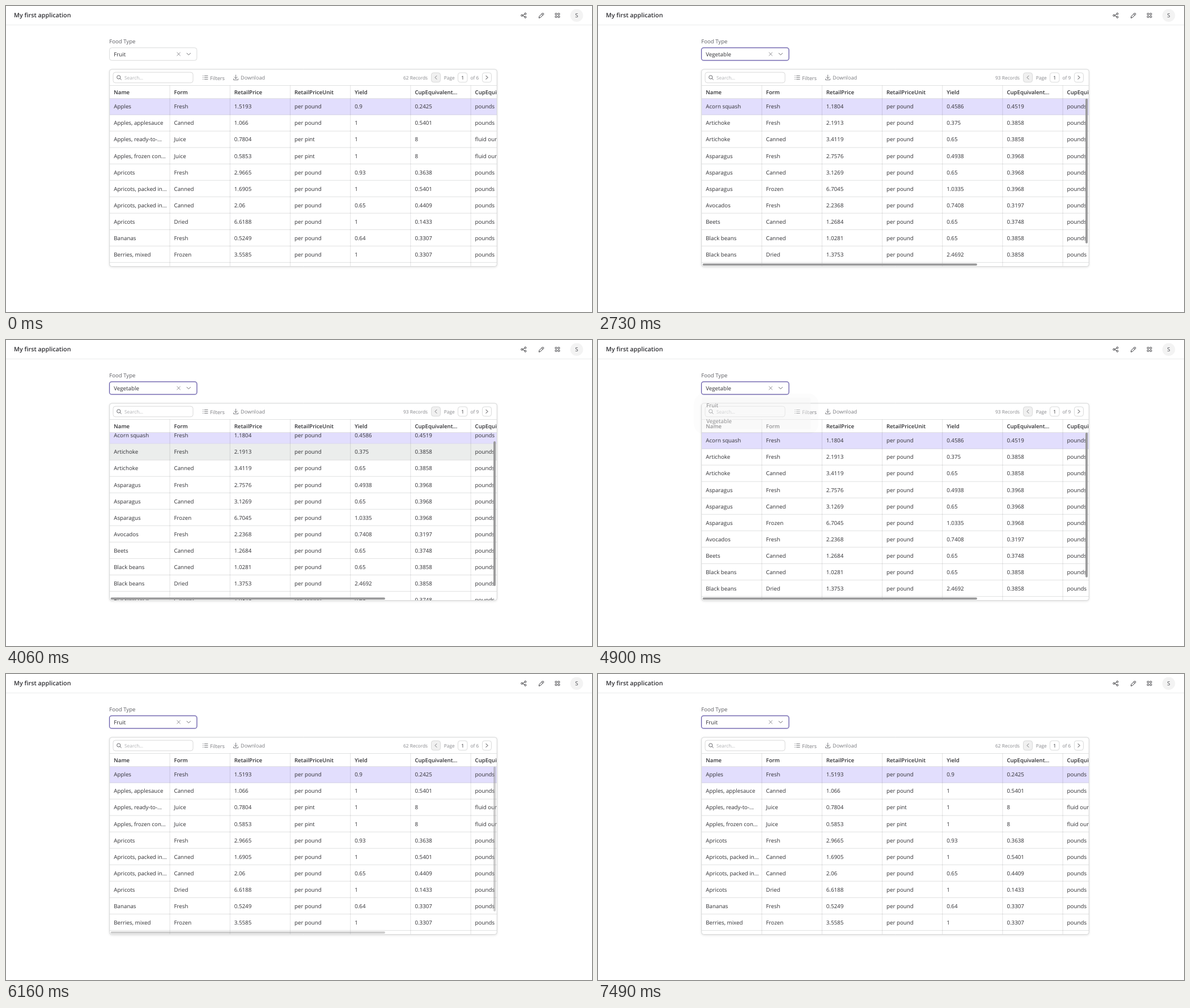
These frames come from a looping animation (1034x541 px, 7840 ms). An HTML page with a canvas:

```html
<!DOCTYPE html>
<html lang="en">
<head>
<meta charset="utf-8">
<title>My first application</title>
<style>
html, body { margin: 0; width: 100%; height: 100%; overflow: hidden; background: #fff; }
canvas { display: block; width: 1034px; height: 541px; }
</style>
</head>
<body>
<canvas id="stage"></canvas>
<script>
const W = 1034, H = 541, LOOP = 7840, STEP = 70;
const canvas = document.getElementById('stage');
const ctx = canvas.getContext('2d');
const dpr = window.devicePixelRatio || 1;
canvas.width = W * dpr;
canvas.height = H * dpr;

const INK = '#2f2f33', GRAY = '#7b7c80', LINE = '#e0e1e1', BORDER = '#d9dada';
const ACCENT = '#655aa8', SELECTED = '#e2defd', HOVER = '#ebedec';
const LEFT = 182.8, RIGHT = 866, BODY = 163.5, BOTTOM = 460, COL = 106.22, ROW = 29.03;

const HEADS = ['Name', 'Form', 'RetailPrice', 'RetailPriceUnit', 'Yield', 'CupEquivalent...', 'CupEquivalentUnit'];
const parse = text => text.trim().split('\n').map(line => line.trim().split('|'));
const FRUIT = parse(`
  Apples|Fresh|1.5193|per pound|0.9|0.2425|pounds
  Apples, applesauce|Canned|1.066|per pound|1|0.5401|pounds
  Apples, ready-to-...|Juice|0.7804|per pint|1|8|fluid ounces
  Apples, frozen con...|Juice|0.5853|per pint|1|8|fluid ounces
  Apricots|Fresh|2.9665|per pound|0.93|0.3638|pounds
  Apricots, packed in...|Canned|1.6905|per pound|1|0.5401|pounds
  Apricots, packed in...|Canned|2.06|per pound|0.65|0.4409|pounds
  Apricots|Dried|6.6188|per pound|1|0.1433|pounds
  Bananas|Fresh|0.5249|per pound|0.64|0.3307|pounds
  Berries, mixed|Frozen|3.5585|per pound|1|0.3307|pounds`);
const VEGETABLES = parse(`
  Acorn squash|Fresh|1.1804|per pound|0.4586|0.4519|pounds
  Artichoke|Fresh|2.1913|per pound|0.375|0.3858|pounds
  Artichoke|Canned|3.4119|per pound|0.65|0.3858|pounds
  Asparagus|Fresh|2.7576|per pound|0.4938|0.3968|pounds
  Asparagus|Canned|3.1269|per pound|0.65|0.3968|pounds
  Asparagus|Frozen|6.7045|per pound|1.0335|0.3968|pounds
  Avocados|Fresh|2.2368|per pound|0.7408|0.3197|pounds
  Beets|Canned|1.2684|per pound|0.65|0.3748|pounds
  Black beans|Canned|1.0281|per pound|0.65|0.3858|pounds
  Black beans|Dried|1.3753|per pound|2.4692|0.3858|pounds
  Blackeye peas|Canned|1.0375|per pound|0.65|0.3748|pounds`);

// Keyframes are [time, value]; tween blends between them, hold jumps.
const POPUP = [[1190, 0], [1260, .3], [1330, 1], [2030, 1], [2100, .4], [2170, 0],
  [4830, 0], [4900, .3], [4970, .75], [5040, 1], [5250, 1], [5320, .5], [5390, 0]];
const BARS = [[2030, 0], [2170, 1], [5250, 1], [5530, 0], [6090, 0], [6230, 1], [7210, 1], [7490, 0]];
const SCROLL = [[3290, 0], [3360, 4], [3430, 15], [3500, 22.7], [3920, 22.7], [3990, 17], [4060, 9], [4130, 3], [4200, 0]];
const SEARCH = [[5390, 0], [5530, 1], [5670, 1], [5740, 0]];
const ROW_HOVER = [[0, -1], [3360, 1], [3430, 2], [4060, 1], [4200, -1],
  [6230, 2], [6300, 4], [6370, 5], [6720, 6], [6790, -1]];

function tween(keys, t) {
  const i = keys.findIndex(k => k[0] > t);
  if (i === 0) return keys[0][1];
  if (i < 0) return keys[keys.length - 1][1];
  const [t0, a] = keys[i - 1], [t1, b] = keys[i];
  return a + (b - a) * (t - t0) / (t1 - t0);
}
const hold = (keys, t) => keys.filter(k => k[0] <= t).pop()[1];
const within = (t, from, to) => t >= from && t < to;

function text(str, x, middle, { size = 9.75, weight = 500, color = INK, align = 'left' } = {}) {
  ctx.font = `${weight} ${size}px "Open Sans", "Noto Sans", sans-serif`;
  ctx.fillStyle = color;
  ctx.textAlign = align;
  ctx.fillText(str, x, middle + size * .36);
}

function box(x, y, w, h, r, fill, stroke, width = 1) {
  ctx.beginPath();
  ctx.roundRect(x, y, w, h, r);
  if (fill) { ctx.fillStyle = fill; ctx.fill(); }
  if (stroke) { ctx.strokeStyle = stroke; ctx.lineWidth = width; ctx.stroke(); }
}

function rect(x, y, w, h, fill) {
  ctx.fillStyle = fill;
  ctx.fillRect(x, y, w, h);
}

function path(d, x, y, color = INK, width = 1) {
  ctx.save();
  ctx.translate(x, y);
  ctx.strokeStyle = color;
  ctx.lineWidth = width;
  ctx.lineCap = ctx.lineJoin = 'round';
  ctx.stroke(new Path2D(d));
  ctx.restore();
}

function ring(x, y, r, color = INK, width = 1) {
  ctx.beginPath();
  ctx.arc(x, y, r, 0, Math.PI * 2);
  ctx.strokeStyle = color;
  ctx.lineWidth = width;
  ctx.stroke();
}

function withShadow(color, blur, dy, draw) {
  ctx.save();
  ctx.shadowColor = color;
  ctx.shadowBlur = blur * dpr;
  ctx.shadowOffsetY = dy * dpr;
  draw();
  ctx.restore();
}

function drawTopBar() {
  rect(0, 33, W, 1, '#ebecec');
  text('My first application', 14, 16.5, { size: 10.8, weight: 600 });

  path('M3 -2.7 L-2.5 0 L3 2.7', 913.3, 16.7, INK, .9);
  for (const [x, y] of [[916.4, 13.7], [910.3, 16.7], [916.4, 19.7]]) {
    ctx.beginPath();
    ctx.arc(x, y, 1.5, 0, 7);
    ctx.fillStyle = '#fff';
    ctx.fill();
    ring(x, y, 1.5);
  }
  path('M-4 4 L-3.5 1.5 L2 -4 Q3 -4.6 4 -3.6 Q4.7 -2.6 4 -1.8 L-1.5 3.5 Z M.9 -2.8 L3 -.8', 944.5, 16.8);
  for (const x of [970.6, 975.4])
    for (const y of [14.2, 19]) box(x - 1.5, y - 1.5, 3, 3, 1.2, null, INK);

  ctx.beginPath();
  ctx.arc(1007, 16.7, 11.3, 0, 7);
  ctx.fillStyle = '#f3f3f3';
  ctx.fill();
  text('S', 1007, 16.7, { size: 9.75, color: '#4c4d52', align: 'center' });
}

function drawSelect(t, value) {
  text('Food Type', 182.3, 62.5, { size: 9.6, color: '#5c5d62' });
  const focused = t >= 1120;
  if (focused) box(182.6, 73.8, 154.2, 22.4, 4, null, 'rgba(101,90,168,.15)', 2.8);
  const border = focused ? ACCENT : t >= 910 ? '#a0a1a3' : BORDER;
  box(182.6, 73.8, 154.2, 22.4, 4, '#fff', border, focused ? 1.2 : 1);
  text(value, 190.2, 85);
  path('M-2.8 -2.8 L2.8 2.8 M2.8 -2.8 L-2.8 2.8', 304.6, 85, '#808185', .9);
  path('M-3.2 -1.6 L0 1.6 L3.2 -1.6', 322.3, 85, '#66676b');
}

function drawToolbar(t, veg) {
  const small = { size: 8.4, color: '#85868a' };
  const hover = tween(SEARCH, t);
  const shade = Math.round(217 - 70 * hover);
  box(189, 117.2, 141, 18.6, 4, '#fff', `rgb(${shade},${shade},${shade})`);
  ring(198.8, 125.9, 3.1, '#66676b');
  path('M0 0 L2 2', 201.3, 128.4, '#66676b');
  text('Search...', 209, 126.5, { size: 8.4, color: '#afb0b3' });

  path('M3.2 -3 H9 M3.2 0 H9 M3.2 3 H9 M.5 -3 H.9 M.5 0 H.9 M.5 3 H.9', 347, 126.5, GRAY);
  text('Filters', 360, 127.2, { size: 9.2, color: GRAY });
  const download = within(t, 5810, 5880) ? INK : GRAY;
  path('M4.5 -4.5 V1.8 M1.8 -.8 L4.5 1.9 L7.2 -.8 M.5 2.3 V4.2 H8.5 V2.3', 401, 126.5, download);
  text('Download', 414, 127.2, { size: 9.1, color: download });

  text(veg ? '93 Records' : '62 Records', 701, 126.5, small);
  box(750.5, 118, 16, 16.8, 4, '#f0f0f0', BORDER);
  path('M1.5 -3 L-1.5 0 L1.5 3', 758.5, 126.4, '#77787c');
  text('Page', 772.7, 126.5, small);
  box(797.5, 118, 16.5, 16.8, 4, '#fff', BORDER);
  text('1', 805.8, 126.5, { size: 8.8, align: 'center' });
  text(veg ? 'of 9' : 'of 6', 819.5, 126.5, small);
  box(840.5, 118, 16, 16.8, 4, '#fff', BORDER);
  path('M-1.5 -3 L1.5 0 L-1.5 3', 848.5, 126.4);
}

function drawRows(t, rows, scroll) {
  const hovered = hold(ROW_HOVER, t);
  ctx.save();
  ctx.beginPath();
  ctx.rect(LEFT, BODY, RIGHT - LEFT, BOTTOM - BODY);
  ctx.clip();
  rows.forEach((cells, i) => {
    const y = BODY + i * ROW - scroll;
    if (i === 0) rect(LEFT, y, RIGHT - LEFT, ROW, SELECTED);
    else if (i === hovered) rect(LEFT, y, RIGHT - LEFT, ROW, HOVER);
    rect(LEFT, y + ROW - .9, RIGHT - LEFT, 1, i === 0 ? '#d5d2e6' : LINE);
    cells.forEach((cell, c) => text(cell, 190.3 + c * COL, y + 14.4));
  });
  ctx.restore();
}

function drawTable(t, veg) {
  const scroll = tween(SCROLL, t);
  withShadow('rgba(0,0,0,.14)', 4, 1, () => box(182.7, 112, 683.6, 348.5, 4, '#fff'));

  ctx.save();
  ctx.beginPath();
  ctx.roundRect(182.7, 112, 683.6, 348.5, 4);
  ctx.clip();
  drawToolbar(t, veg);
  drawRows(t, veg ? VEGETABLES : FRUIT, scroll);
  rect(LEFT, 140, RIGHT - LEFT, 1, LINE);
  rect(LEFT, 163, RIGHT - LEFT, 1, LINE);
  HEADS.forEach((head, c) => {
    text(head, 190.3 + c * COL, 152.4, { size: 9.6, weight: 600 });
    if (c) rect(LEFT + c * COL - .5, 140.5, 1, BOTTOM - 140.5, 'rgba(0,0,20,.115)');
  });
  ctx.restore();
  box(182.7, 112, 683.6, 348.5, 4, null, '#d6d7d7');

  ctx.globalAlpha = tween(BARS, t);
  box(860.1, 163.8 + scroll * 1.7, 4, 256, 2, '#9b9b9c');
  box(184.6, 455.2, 484.4, 3.8, 1.9, '#9b9b9c');
  ctx.globalAlpha = 1;
}

function drawOptions(t) {
  const opacity = tween(POPUP, t);
  if (!opacity) return;
  const picked = t >= 2100 ? 1 : 0;
  const hovered = t > 4000 ? 0 : t >= 1820 ? 1 : -1;
  const settled = opacity > .5;

  // The wide halo and the labels come in ahead of the panel itself.
  const lead = Math.sqrt(opacity);
  ctx.globalAlpha = lead;
  box(169, 94.5, 220, 72, 18, 'rgba(0,0,0,.024)');
  ctx.globalAlpha = opacity;
  if (settled) withShadow('rgba(0,0,0,.2)', 7, 2, () => box(183, 101.6, 192, 57.6, 4, '#fff'));
  else box(183, 101.6, 192, 57.6, 4, '#f8f8f9');
  ctx.save();
  ctx.beginPath();
  ctx.roundRect(183, 101.6, 192, 57.6, 4);
  ctx.clip();
  ['Fruit', 'Vegetable'].forEach((label, i) => {
    const y = 101.6 + i * 28.5;
    const fill = i === picked ? '#d8d1fd' : i === hovered ? HOVER : '#fff';
    ctx.globalAlpha = opacity;
    rect(183, y, 192, 27.2, settled ? fill : '#f0f1f1');
    ctx.globalAlpha = lead;
    text(label, 191.2, y + 13.8);
  });
  ctx.restore();
  ctx.globalAlpha = 1;
}

function draw(now) {
  const t = Math.floor((now % LOOP) / STEP) * STEP;
  ctx.setTransform(dpr, 0, 0, dpr, 0, 0);
  ctx.textRendering = 'geometricPrecision';
  rect(0, 0, W, H, '#fff');
  drawTopBar();
  drawSelect(t, within(t, 2100, 5320) ? 'Vegetable' : 'Fruit');
  drawTable(t, within(t, 2730, 6160));
  drawOptions(t);
}

let start;
function tick(now) {
  start ??= now;
  draw(now - start);
  requestAnimationFrame(tick);
}
draw(0);
requestAnimationFrame(tick);
</script>
</body>
</html>
```
